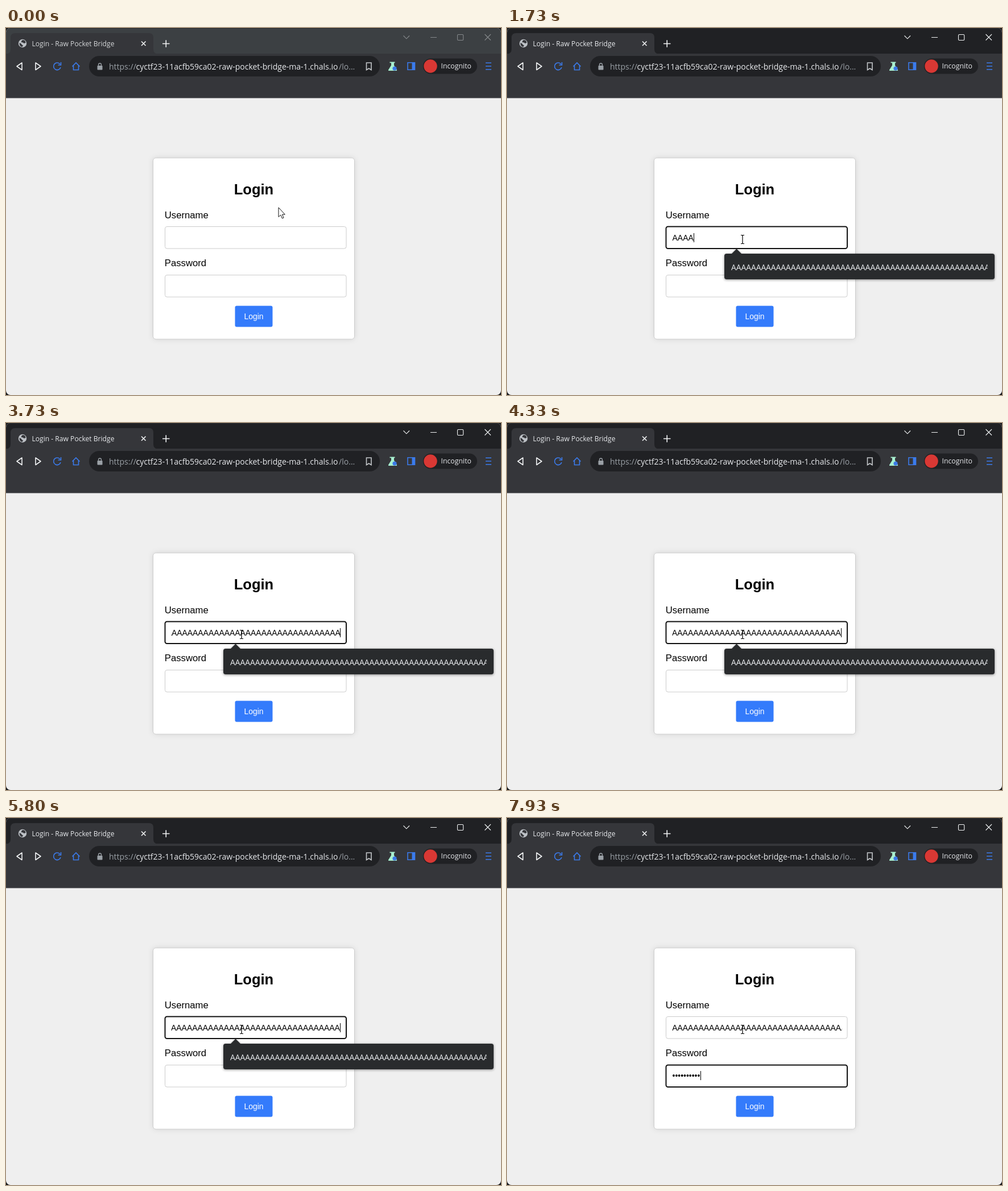
An HTML page for the animation above (8000 ms loop, 870 by 644 pixels).

```html
<!DOCTYPE html>
<html lang="en">
<head>
<meta charset="utf-8">
<title>Login</title>
<style>
  html, body { margin: 0; width: 100%; height: 100%; overflow: hidden; background: #18191b; }
  svg { display: block; width: 870px; height: 644px; }
  text { white-space: pre; }
  .ui { font-family: "Open Sans", "Noto Sans", sans-serif; fill: #e8eaed; }
  .page { font-family: "Liberation Sans", Arial, sans-serif; fill: #000; }
  .entry { font-size: 13.92px; }
  .line { fill: none; stroke: #f1f3f4; stroke-width: 1.6; }
  .blue { stroke: #3b7bec; }
  .bar { fill: #3c4043; }
  .controls { fill: none; stroke: #85888b; stroke-width: 1.1; }
  .title { fill: #d4d6d8; }
  .active .bar { fill: #202124; }
  .active .controls { stroke: #f1f3f4; }
  .active .title { fill: #e8eaed; }
  .field { fill: #fff; stroke: #ccc; stroke-width: 1; }
  .field.focus { stroke: #101010; stroke-width: 2; }
  .card { fill: #fff; stroke: #ccc; filter: drop-shadow(0 0 5px rgba(0, 0, 0, .1)); }
  #popup { transform-origin: 619.5px 418px; filter: drop-shadow(0 1.5px 2px rgba(0, 0, 0, .45)); }
</style>
</head>
<body>
<svg id="stage" viewBox="0 0 870 644">
  <defs>
    <clipPath id="window"><rect width="870" height="644" rx="8"/></clipPath>
    <clipPath id="fieldClip"><rect x="290.4" y="350" width="297.8" height="36"/></clipPath>
    <clipPath id="popupClip"><rect x="390" y="396" width="454.5" height="90"/></clipPath>
  </defs>

  <g clip-path="url(#window)">
    <rect width="870" height="644" fill="#efefef"/>
    <rect class="bar" width="870" height="46"/>
    <rect width="870" height="1" fill="#2a2b2d"/>
    <rect y="45" width="870" height="78" fill="#35363a"/>
    <rect y="122" width="870" height="1.2" fill="#505154"/>

    <!-- Tab strip -->
    <path fill="#35363a" d="M0 45.5Q8 45.5 8 37V17Q8 9 16 9H251Q259 9 259 17V37Q259 45.5 267 45.5Z"/>
    <circle cx="29" cy="27" r="7.2" fill="#bdc1c6"/>
    <path fill="#35363a" d="M23.5 26q3 .5 4 2.500t2 1.500q1 2-1.500 3.200q-4.500-1-4.500-7.200ZM28 21.500q3-1.500 5.500 1l1.200 3.500l-3 1l-2-1.500l-3-.5q0-1.500 1.300-3.500Z"/>
    <text class="ui title" x="45.5" y="31.500" font-size="12.1">Login - Raw Pocket Bridge</text>
    <path class="line" d="M238 23.500l7.500 7.500m0-7.500l-7.500 7.500"/>
    <path class="line" stroke-width="1.800" d="M275 27.500h12.500m-6.250-6.250v12.500"/>
    <path class="controls" d="M698.500 13.500l5.300 5.300l5.300-5.300M746 16.500h11M841.500 11l10.500 10.500m0-10.500l-10.500 10.500"/>
    <rect class="controls" x="793.500" y="11.500" width="10.200" height="10" rx="1.500"/>

    <!-- Toolbar -->
    <path class="line" stroke-linejoin="round" d="M28 61v12.500l-9-6.250ZM52 61v12.500l9-6.250Z"/>
    <path class="line blue" d="M95 63.500A6.300 6.300 0 1 0 96 69M96.500 60v5h-5"/>
    <path class="line blue" d="M116.500 67.500l6.500-6.500l6.500 6.500M118.500 66v7.500h9V66"/>
    <rect x="146" y="49" width="511" height="36" rx="18" fill="#202124"/>
    <rect x="160.500" y="66" width="9" height="7.500" rx="1" fill="#9aa0a6"/>
    <path d="M162.500 66v-1.500a2.500 2.500 0 0 1 5 0V66" fill="none" stroke="#9aa0a6" stroke-width="1.300"/>
    <g class="ui" font-size="14.03">
      <text x="181" y="72.500" style="fill:#9aa0a6">https://</text>
      <text x="228.500" y="72.500">cyctf23-11acfb59ca02-raw-pocket-bridge-ma-1.chals.io</text>
      <text x="585" y="72.500" style="fill:#9aa0a6">/lo...</text>
    </g>
    <path class="line" style="stroke:#c4c7ca" d="M633.500 61h8.500v12.500l-4.250-2.500l-4.250 2.500Z"/>
    <path fill="#a8f0d0" d="M674.500 59.500h9v1.800h-1.500v4.200l5 8q.5 1.500-1 1.500h-13q-1.500 0-1-1.500l5-8v-4.200h-2.500Z"/>
    <circle cx="683" cy="71" r="3.600" fill="#3b78e7"/>
    <path class="line blue" d="M706 60.800h12.500v12.400h-12.500Z"/>
    <rect x="713.500" y="60.500" width="5.500" height="13" fill="#3b7bec"/>
    <rect x="733" y="53.500" width="95" height="27" rx="13.500" fill="#202124"/>
    <circle cx="746" cy="67" r="11.700" fill="#d93834"/>
    <text class="ui" x="764.500" y="71.300" font-size="12.300">Incognito</text>
    <path class="line blue" d="M843 61.300h10M843 67h10M843 72.700h10"/>

    <!-- Login form -->
    <rect class="card" x="258.500" y="228" width="354" height="318" rx="5"/>
    <g class="page">
      <text x="435.500" y="292" font-size="25.500" font-weight="bold" text-anchor="middle">Login</text>
      <text x="278.800" y="333.800" font-size="16.700">Username</text>
      <text x="278.800" y="418" font-size="16.700">Password</text>
    </g>
    <rect id="userField" class="field" x="279.500" y="348.500" width="318.500" height="38.500" rx="3.500"/>
    <rect id="passField" class="field" x="279.500" y="433.500" width="318.500" height="38.500" rx="3.500"/>
    <g clip-path="url(#fieldClip)"><text id="userText" class="page entry" y="372.500"></text></g>
    <text id="passText" class="page entry" x="290.600" y="457"></text>
    <rect id="caret" width="1" height="16"/>
    <rect x="402.500" y="487.500" width="66" height="37" rx="3" fill="#347bfb"/>
    <text class="page entry" x="435.500" y="511" text-anchor="middle" style="fill:#fff">Login</text>

    <!-- Suggestions -->
    <g id="popup">
      <path fill="#292b2d" d="M394 397l9.500-9.500l9.500 9.500Z"/>
      <rect id="popupBox" x="382" y="396" width="475" height="84" rx="4" fill="#292b2d"/>
      <g class="ui" font-size="13.800" clip-path="url(#popupClip)">
        <text id="firstHint" x="394" y="424.500" font-size="13">user</text>
        <text id="longHint" x="394"></text>
      </g>
    </g>

    <path id="arrow" fill="#fff" stroke="#111" d="M0 0V16.500L3.800 13L6.400 19L9 18L6.500 12.200H11.300Z"/>
    <path id="beam" fill="none" stroke="#000" stroke-width="1.200" d="M-3-7.500h2l1 1l1-1h2M-3 7.500h2l1-1l1 1h2M0-6.500V6.500"/>
  </g>
</svg>

<script>
  const LOOP = 8000, TICK = 1000 / 15;
  const LEFT = 290.6, RIGHT = 587.2, CAPACITY = 32;
  const A_WIDTH = 9.285, DOT_WIDTH = 4.872;
  // Moments, counted in ticks
  const MOVED = 7, ACTIVATE = 10, SUGGEST = 11, FIRST_KEY = 18, REPEAT = 25, RELEASE = 94;
  const TAB = 98, BLINK = 106, FIRST_DOT = 108, DOT_REPEAT = 115;
  const FADE = [0.9, 0.6, 0.25];

  const $ = id => document.getElementById(id);
  const show = (id, on) => $(id).setAttribute("visibility", on ? "visible" : "hidden");
  const set = (id, attrs) => {
    for (const key in attrs) $(id).setAttribute(key, attrs[key]);
  };

  function drawPointer(tick) {
    const p = Math.min(tick / MOVED, 1);
    const ease = p * p * (3 - 2 * p);
    const x = 479 - 65 * ease, y = 315 + 56 * ease;
    const overField = y > 349;
    set("arrow", { transform: `translate(${x} ${y})` });
    set("beam", { transform: `translate(${x} ${y})` });
    show("arrow", !overField);
    show("beam", overField);
  }

  function drawUsername(tick) {
    const step = Math.min(tick, RELEASE) - REPEAT;
    const count = tick < FIRST_KEY ? 0 : step < 0 ? 1 : 2 + 2 * step;
    const scrolled = count >= CAPACITY && tick < TAB;
    const shown = Math.min(count, CAPACITY + 1);
    const end = RIGHT + (step % 2 ? 0.9 : 0);
    $("userText").textContent = "A".repeat(shown);
    set("userText", { x: scrolled ? end - shown * A_WIDTH : LEFT - (tick >= TAB ? 0.4 : 0) });
    return scrolled ? RIGHT - 0.2 : LEFT + 0.4 + count * A_WIDTH;
  }

  function drawPassword(tick) {
    const count = tick < FIRST_DOT ? 0 : tick < DOT_REPEAT ? 1 : 2 + 2 * (tick - DOT_REPEAT);
    $("passText").textContent = "•".repeat(count);
    return LEFT + 0.4 + count * DOT_WIDTH;
  }

  function drawPopup(tick) {
    const typed = tick >= FIRST_KEY;
    const opacity = tick < SUGGEST ? 0 : tick < TAB ? 1 : FADE[tick - TAB] || 0;
    $("popup").style.opacity = opacity;
    $("popup").style.transform = `scale(${0.95 + 0.05 * Math.min(1, opacity)})`;
    set("popupBox", { height: typed ? 45 : 84 });
    set("longHint", { y: typed ? 424.5 : 461.5 });
    show("firstHint", !typed);
  }

  function draw(tick) {
    const active = tick >= ACTIVATE, inPassword = tick >= TAB;
    $("stage").classList.toggle("active", active);
    $("userField").classList.toggle("focus", active && !inPassword);
    $("passField").classList.toggle("focus", inPassword);
    const userCaret = drawUsername(tick), passCaret = drawPassword(tick);
    set("caret", { x: Math.round(inPassword ? passCaret : userCaret), y: inPassword ? 444 : 360 });
    show("caret", active && !(tick >= BLINK && tick < FIRST_DOT));
    drawPopup(tick);
    drawPointer(tick);
  }

  $("longHint").textContent = "A".repeat(60);
  const start = performance.now();
  function loop() {
    const time = (performance.now() - start) % LOOP;
    draw(Math.floor((time + 4) / TICK) % 120);
    requestAnimationFrame(loop);
  }
  loop();
</script>
</body>
</html>
```
